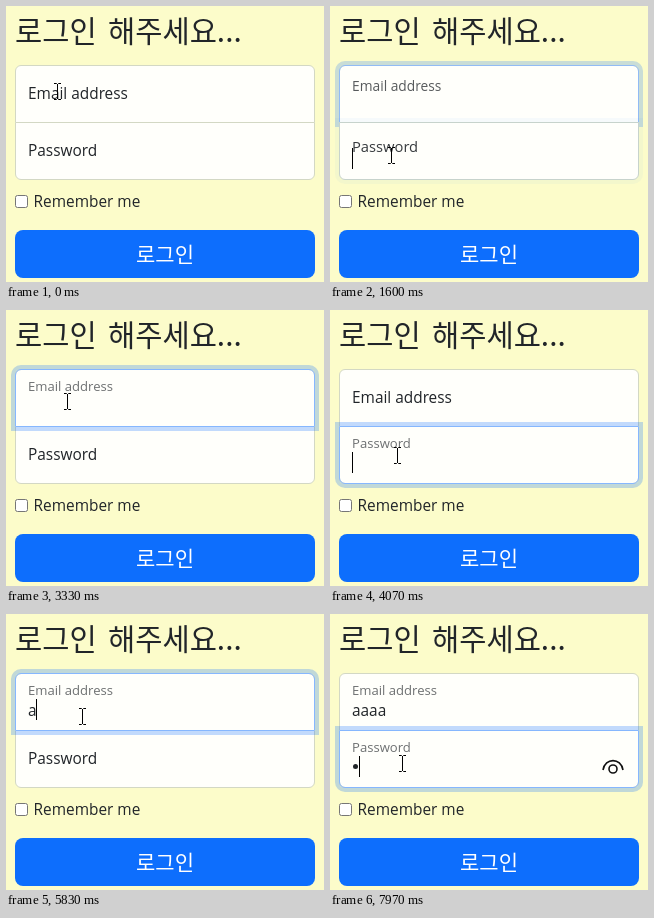
Recreate the animation shown at these times as an HTML page. Size 318 by 276 pixels, loop 8000 ms.

```html
<!DOCTYPE html>
<html lang="ko">
<head>
<meta charset="utf-8">
<title>로그인</title>
<style>
  * { box-sizing: border-box; }
  html, body { margin: 0; width: 100%; height: 100%; overflow: hidden; }
  body {
    position: relative;
    background: #fcfcca;
    color: #212529;
    font: 15.4px/24px "Open Sans", "Noto Sans", sans-serif;
    white-space: nowrap;
  }
  body > *, .field > * { position: absolute; }

  h1 {
    left: 9px; top: 7px; margin: 0;
    font: 300 29.6px/34px "Noto Sans CJK KR", "Noto Sans CJK", sans-serif;
    word-spacing: 3px;
  }

  .field { left: 9px; width: 300px; height: 58px; }
  .email { top: 59px; }
  .password { top: 116px; }

  .box, .ring { inset: 0; border: 1px solid #d3d8c4; border-radius: inherit; }
  .box { background: #fffffb; }
  .ring { border-color: #86b7fe; box-shadow: 0 0 0 4px rgba(13, 110, 253, .25); }
  .email { border-radius: 6px 6px 0 0; }
  .password { border-radius: 0 0 6px 6px; }

  .label { left: 0; top: 0; padding: 17px 13px; transform-origin: 0 0; }
  .value { left: 13px; top: 26px; height: 21px; line-height: 24px; }
  .caret { left: 13px; top: 26px; width: 1px; height: 21px; background: #000; }
  .dot {
    display: inline-block; width: 5px; height: 5px; margin: 0 1px 4px 1px;
    border-radius: 50%; background: #212529; vertical-align: middle;
  }
  .eye { left: 262px; top: 28px; fill: none; stroke: #111; stroke-width: 1.6; }

  .check {
    left: 9px; top: 189px; width: 13px; height: 13px;
    background: #fff; border: 1px solid #767676; border-radius: 2.5px;
  }
  .remember { left: 27.6px; top: 184px; }
  .submit {
    left: 9px; top: 224px; width: 300px; height: 48px;
    border-radius: 8px; background: #0d6efd; color: #fff;
    font: 21px/46px "Noto Sans CJK KR", "Noto Sans CJK", sans-serif;
    text-align: center;
  }
  .pointer { left: -4px; top: -9px; z-index: 5; fill: none; stroke: #000; }
</style>
</head>
<body>
  <h1>로그인 해주세요...</h1>

  <div class="field email">
    <div class="box"></div>
    <div class="ring"></div>
    <div class="label">Email address</div>
    <div class="value"></div>
    <div class="caret"></div>
  </div>

  <div class="field password">
    <div class="box"></div>
    <div class="ring"></div>
    <div class="label">Password</div>
    <div class="value"></div>
    <div class="caret"></div>
    <svg class="eye" width="24" height="18">
      <path d="M2 12C4 -.5 20 -.5 22 12"/>
      <circle cx="12" cy="11" r="4"/>
    </svg>
  </div>

  <div class="check"></div>
  <div class="remember">Remember me</div>
  <div class="submit">로그인</div>

  <svg class="pointer" width="9" height="17">
    <path d="M1 .5H3.5L4.5 1.5L5.5 .5H8M4.5 1V16M1 16.5H3.5L4.5 15.5L5.5 16.5H8"/>
  </svg>

<script>
  const LOOP = 8000, BLINK = 530;
  const $ = (selector, root = document) => root.querySelector(selector);

  // Focus alternates between the two fields with each click.
  const clicks = [430, 1565, 2500, 3900, 4600, 7150];
  const moves = [
    { start: 600, end: 1450, x: 61, y: 150 },
    { start: 1800, end: 2330, x: 61, y: 92 },
    { start: 3350, end: 3820, x: 66, y: 148 },
    { start: 4000, end: 4500, x: 76, y: 103 },
    { start: 6480, end: 6850, x: 72, y: 150 },
  ];
  const fields = [
    { name: '.email', glyph: 'a', step: 8.4, count: 4, first: 5700, gap: 250 },
    { name: '.password', glyph: '<i class="dot"></i>', step: 7, count: 1, first: 7700, gap: 250 },
  ];
  for (const field of fields) {
    field.el = $(field.name);
    for (const part of ['ring', 'label', 'value', 'caret', 'eye']) {
      field[part] = $('.' + part, field.el);
    }
  }
  const pointer = $('.pointer');

  const ease = p => {
    p = Math.min(1, Math.max(0, p));
    return p * p * (3 - 2 * p);
  };
  const mix = (a, b, k) => a + (b - a) * k;

  // Focus amount of a field whose transition lasts ms.
  const focusLevel = (index, t, ms) => clicks.reduce(
    (level, at, i) => mix(level, i % 2 === index ? 1 : 0, ease((t - at) / ms)), 0);

  function drawField(field, index, t) {
    const { el, ring, label, value, caret, eye } = field;
    const past = clicks.filter(at => at <= t).length;
    const focused = past > 0 && (past - 1) % 2 === index;
    const typed = Math.min(field.count, Math.max(0, Math.floor((t - field.first) / field.gap) + 1));
    const lastKey = typed ? field.first + (typed - 1) * field.gap : 0;
    const since = t - Math.max(clicks[past - 1] || 0, lastKey);
    const float = typed ? 1 : focusLevel(index, t, 100);

    el.style.zIndex = focused ? 2 : index;
    ring.style.opacity = focusLevel(index, t, 150);
    label.style.opacity = mix(1, .65, float);
    label.style.transform =
      `translate(${2 * float}px, ${-6.8 * float}px) scale(${mix(1, .85, float)})`;
    value.innerHTML = field.glyph.repeat(typed);
    caret.style.transform = `translateX(${Math.floor(typed * field.step)}px)`;
    caret.style.opacity = focused && since % (2 * BLINK) < BLINK ? 1 : 0;
    if (eye) eye.style.opacity = typed ? 1 : 0;
  }

  function draw(now) {
    const t = now % LOOP;
    fields.forEach((field, i) => drawField(field, i, t));
    let x = 51, y = 86;
    for (const move of moves) {
      const k = ease((t - move.start) / (move.end - move.start));
      x = mix(x, move.x, k);
      y = mix(y, move.y, k);
    }
    pointer.style.transform = `translate(${Math.round(x)}px, ${Math.round(y)}px)`;
  }

  const start = performance.now();
  function frame(now) {
    draw(Math.max(0, now - start));
    requestAnimationFrame(frame);
  }
  draw(0);
  requestAnimationFrame(frame);
</script>
</body>
</html>
```
